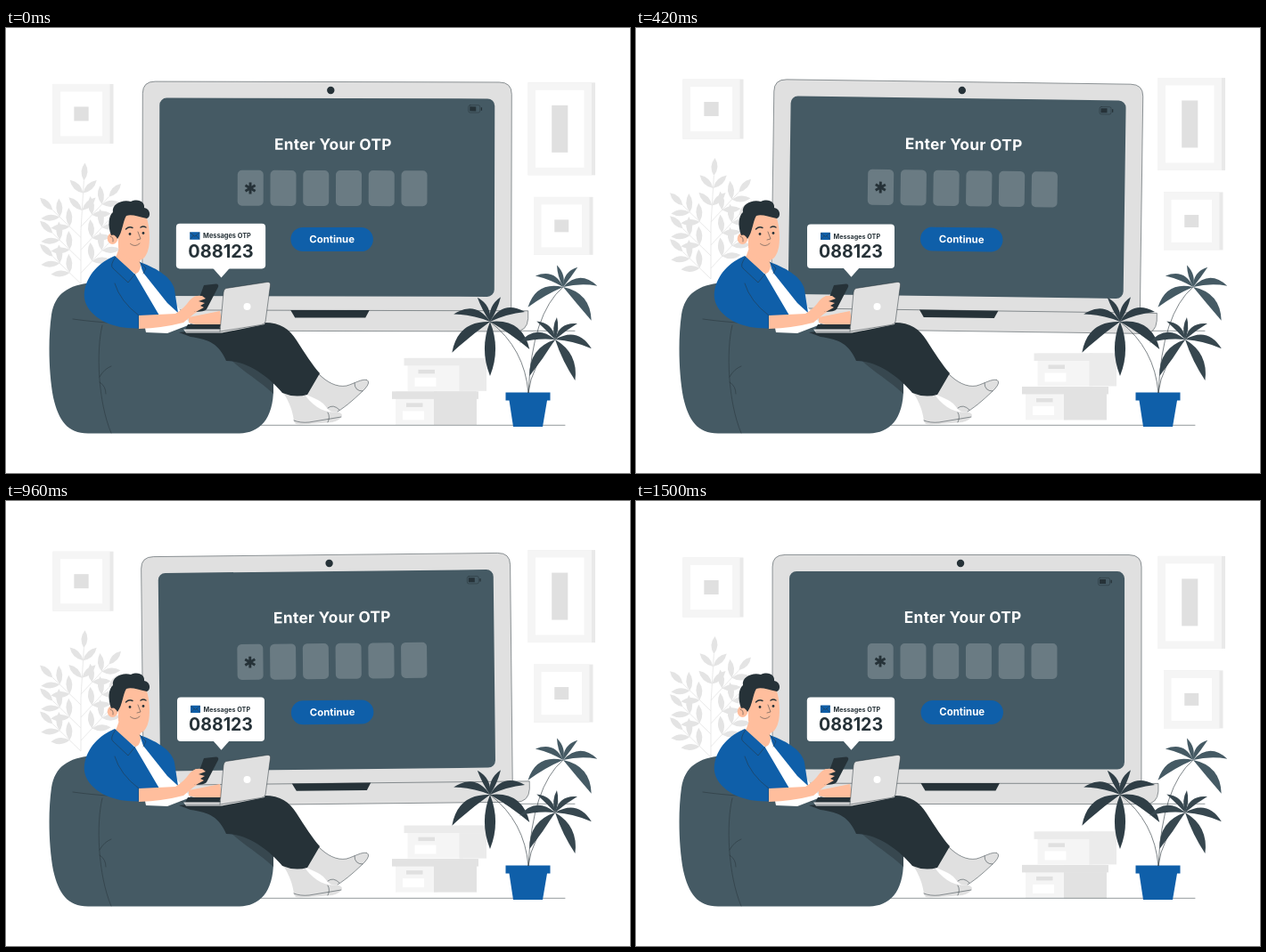
Animation, 700 px wide and 500 px high, one loop 1.54 s. Source, as an HTML page:

```html
<!DOCTYPE html>
<html lang="en">
<head>
<meta charset="utf-8">
<title>Enter Your OTP</title>
<style>
  html, body { margin: 0; width: 100%; height: 100%; overflow: hidden; background: #fff; }
  svg { display: block; width: 100vw; height: 100vh; }
  text { font-family: Inter, "Open Sans", sans-serif; font-weight: 700; text-anchor: middle; }
  .line { fill: none; stroke: #263238; stroke-width: .5; stroke-linecap: round; stroke-linejoin: round; }
  .bold { stroke-width: 1.4; }
  .blue { fill: #0f5fa9; }
  .dark { fill: #263238; }
  .slate { fill: #455a64; }
  .skin { fill: #ffbe9d; }
  .grey { fill: #e0e0e0; }
  .white { fill: #fff; }
</style>
</head>
<body>
<svg viewBox="0 0 700 500">
  <g id="backdrop"></g>
  <path class="line" d="M285 446.300H627M560 340.300H638"/>

  <g id="monitor">
    <path class="grey" d="M153 318V74Q153 60.500 167 60.500H553Q567 60.500 567 74V317H586V326Q585 340.500 571 340.500H134V317H153"/>
    <path class="line" d="M153 318V74Q153 60.500 167 60.500H553Q567 60.500 567 74V317M134 317.300H586V326Q585 340.500 571 340.500H134"/>
    <rect class="slate" x="172" y="79" width="376" height="222.500" rx="8"/>
    <circle class="dark" cx="364" cy="70" r="4.200"/>
    <path class="dark" d="M319.500 317H408L403.500 325.500H324.500Z"/>
    <rect class="line" x="518.500" y="86.300" width="13" height="8.400" rx="2"/>
    <path class="dark" d="M520 88h7v5h-7zM532.500 88.800h1.300v3.500h-1.300z"/>
    <text x="366.700" y="136.800" font-size="17.300" letter-spacing=".3" fill="#fff">Enter Your OTP</text>
    <g id="cells"></g>
    <rect class="blue" x="319.500" y="224" width="92.500" height="27" rx="13.500"/>
    <text x="365.700" y="241.300" font-size="11.400" fill="#fff">Continue</text>
  </g>

  <g id="bubble">
    <rect class="white" x="192" y="220.500" width="98" height="49.500" rx="4"/>
    <path class="white" d="M232 269H251L241.500 279.700Z"/>
    <rect class="blue" x="207" y="229.700" width="11" height="8.300" rx="1"/>
    <path class="line" d="M207.300 230.200L212.500 234.600 217.700 230.200M207.400 237.600L211 233.600M217.600 237.600L214 233.600"/>
    <text class="dark" x="247.800" y="236.800" font-size="7.200">Messages OTP</text>
    <text class="dark" x="241" y="258.300" font-size="19.500">088123</text>
  </g>

  <g id="beanbag">
    <path class="slate" d="M96 286C70 289 55 298 51 322C47 350 48 388 53 415C59 441 69 455.500 92 455.500H262C284 455 300 440 300 405L290 374 250 340 150 322Z"/>
    <path fill="#37474f" d="M244 362C252 378 280 392 300 411L300 396 282 368Z"/>
    <path class="line" d="M75 327C130 335 200 332 243 348M108 334C101 362 103 420 118 455M105 392Q110 383 118 380M105 398Q112 402 112 411"/>
  </g>

  <g id="legs">
    <path class="grey" d="M311 410C318 420 322 432 323 442Q325 447 333 445.500L366 443Q375 441 377 435Q376 431 368 431.500C355 432 343 424 333 409Z"/>
    <path class="grey" d="M351 388C360 398 371 404 382 402C392 399 399 394 405 395.500Q409 398 403 405C394 414 382 425 372 431Q365 433 360 427C355 419 346 416 337 412Z"/>
    <path class="line" d="M323 441Q330 444 340 443L376 437M361 432Q364 437 361 443M351 389C360 398 371 404 382 402C392 399 399 394 405 395.500Q409 398 403 405C394 414 382 425 372 431M391 399Q391 408 400 408M361 427Q367 422 374 429"/>
    <path class="dark" d="M194 342L290 331C308 331 318 338 326 351C335 365 344 379 352 388L338 412Q324 416 310 410C296 393 272 374 247 374C239 355 228 350 207 347Z"/>
  </g>

  <g id="man">
    <path class="white" d="M143 274L158 270 196 318 207 333 181 343 157 342Z"/>
    <path class="skin" d="M128 244L150 255 151 268Q150 275 145 276Q134 269 123 258Z"/>
    <path class="blue" d="M122 256C105 263 91 277 88 296C86 311 96 322 110 330Q126 338 149 337.500V323H172L145 277Z"/>
    <path class="blue" d="M150 263C172 271 186 281 189 294L193 320 181 309 154 275Z"/>
    <path class="line" d="M123 257Q116 267 120 270L137 286 145 276M150 263L157 270 154 276M122 287Q128 307 149 323V337"/>
    <path class="skin" d="M149 323L190 321Q200 315 206 306Q211 300 220 301L224 304Q224 315 211 321L199 331Q176 337 149 338Z"/>
    <path class="skin" d="M205 325L240 318 243 333 228 333Q216 335 205 331Z"/>
    <path class="dark" d="M222 289L236 287.500Q239 288 238 291L225 316Q223 319 211 319Z"/>
    <path class="skin" d="M207 306L213 301H220L224 304 216 307 223 309 218 312 222 314 213 319 204 318Z"/>
    <path class="dark" d="M204 333H241L239 339H201Z"/>
    <path class="grey" d="M199 338.500H243L291 329 290 333 242 342.500H202Z"/>
    <path class="grey" d="M247 292.500L293 285.500Q297 285 296.500 289L291 330Q290 333 286 333.500L240 341 244 297Q244.500 293 247 292.500Z"/>
    <path class="line" d="M240 341L244 297Q244.500 293 247 292.500L293 285.500Q297 285 296.500 289L291 330Q290 333 286 333.500L240 341H202"/>
    <circle class="white" cx="270.500" cy="313" r="4"/>

    <path class="skin" d="M125 210L156 208C161 220 162 237 160 247Q157 262 145 262Q133 260 126 247Z"/>
    <ellipse class="skin" cx="119.500" cy="236.500" rx="5.800" ry="6.500"/>
    <path class="dark" d="M118 233C114 222 115 211 120 207C118 197 132 192 140 195C149 191 156 196 155 202C162 203 163 212 158 214C148 212 141 209 135 211C131 217 131 229 125 237Q122 231 118 233Z"/>
    <circle class="dark" cx="139" cy="231.500" r="1.400"/>
    <circle class="dark" cx="154" cy="230.500" r="1.400"/>
    <path class="line bold" d="M134.500 226Q138 222.500 142 224.500M151 224Q154 222 157 224"/>
    <path class="line" d="M139.500 242.500Q145 247 150 242M148 229L151 237 147 238M117 234Q121 235 120 240"/>
  </g>

  <g id="plant">
    <path class="blue" d="M560.500 409.500H610.500V418.500H607L602 448H569L564.500 418.500H560.500Z"/>
  </g>
</svg>
<script>
const $ = id => document.getElementById(id);
const backdrop = $("backdrop"), plant = $("plant"), cells = $("cells");

function add(parent, tag, attrs) {
  const el = document.createElementNS("http://www.w3.org/2000/svg", tag);
  for (const k in attrs) el.setAttribute(k, attrs[k]);
  parent.append(el);
}

const rect = (parent, x, y, width, height, fill, rx = 0) =>
  add(parent, "rect", { x, y, width, height, fill, rx });

const stroke = (parent, d, color, width) =>
  add(parent, "path", { d, fill: "none", stroke: color, "stroke-width": width });

// Pointed leaf at angle a from upright; bend arches it towards the sky
function leaf(parent, x, y, a, len, w, bend, fill) {
  const s = Math.sin(a), c = Math.cos(a), lift = bend * s;
  const at = (along, across) => `${x + s * along - c * across} ${y - c * along - s * across}`;
  const side = k => `${at(len * .5, lift + k * w)} ${at(len, 0)}`;
  add(parent, "path", { fill, d: `M${at(0, 0)}Q${side(1)}Q${at(len * .5, lift - w)} ${at(0, 0)}` });
}

function picture(x, y, w, h) {
  const face = w - 4, bw = w * .24, bh = h - 51;
  rect(backdrop, x, y, w, h, "#e9e9e9");
  rect(backdrop, x, y, face, h, "#f5f5f5");
  rect(backdrop, x + 8.5, y + 8.5, face - 17, h - 17, "#fff");
  rect(backdrop, x + (face - bw) / 2, y + (h - bh) / 2, bw, bh, "#e0e0e0");
}

function crate(x, y, w, split, h, shade) {
  rect(backdrop, x + 4, y, split, h, "#f5f5f5");
  rect(backdrop, x + split, y, w - split - 2, h, shade);
  rect(backdrop, x, y, w, 8.5, shade);
  rect(backdrop, x + 16, y + 13, 18.5, 4.5, "#e0e0e0");
  rect(backdrop, x + 12, y + 22, 24, 10, "#fff");
}

// Alternating branches up one stem, each with paired leaves
function bush(x, y) {
  const pale = "#e4e4e4";
  const branch = (x0, y0, a, len) => {
    const s = Math.sin(a), c = Math.cos(a);
    stroke(backdrop, `M${x0} ${y0}l${s * len} ${-c * len}`, pale, .8);
    for (const k of [.4, .75])
      for (const turn of [-.85, .75])
        leaf(backdrop, x0 + s * len * k, y0 - c * len * k, a + turn, 21, 7, 0, pale);
    leaf(backdrop, x0 + s * len, y0 - c * len, a, 20, 7, 0, pale);
  };
  stroke(backdrop, `M${x} ${y}V${y - 60}`, pale, .8);
  for (let i = 0; i < 3; i++) {
    branch(x, y - 26 * i, -.8, 44);
    branch(x, y - 26 * i - 12, .75, 46);
  }
  branch(x, y - 60, .06, 56);
}

// Fan of leaves that grow longer and arch more as they hang lower
function crown(x, y, size, from, to, n, fill) {
  stroke(plant, `M586 410Q${586 + (x - 586) * .1} ${y + 30} ${x} ${y}`, "#263238", .6);
  for (let i = 0; i < n; i++) {
    const a = (from + (to - from) * i / (n - 1)) * Math.PI / 180;
    const len = size * (1 + (1 - Math.cos(a)) * .55);
    leaf(plant, x, y, a, len, len * .2, len * .3, fill);
  }
}

picture(52.5, 63.6, 68, 67);
picture(585.5, 62, 75.5, 104);
picture(592, 190.5, 66.5, 65);
bush(84, 288);
crate(446.5, 371.5, 94.5, 62, 37, "#ebebeb");
crate(433, 409, 97, 47, 37.5, "#e2e2e2");

for (let i = 0; i < 6; i++) rect(cells, 259.7 + 36.75 * i, 160, 29, 40, "#6a7b83", 5);
for (let i = 0; i < 3; i++)
  add(cells, "path", { d: "M274 173.800V186.600", stroke: "#263238", "stroke-width": 2.9, transform: `rotate(${60 * i} 274 180.200)` });

crown(625, 291, 25, -120, 140, 6, "#455a64");
crown(543, 330, 29, -180, 125, 7, "#2f3e46");
crown(616, 350, 25, -145, 154, 7, "#37474f");

const LOOP = 1540, STEPS = 37, LEAD = 50;

const sway = p => Math.asin(Math.sin(2 * Math.PI * p)) * 2 / Math.PI;
const peak = (p, mid, half) => Math.max(0, 1 - Math.abs(p - mid) / half);

function draw() {
  const step = Math.floor(((performance.now() + 2) % LOOP) / LOOP * STEPS);
  const p = (step / STEPS + LEAD / LOOP) % 1;
  const beat = 1 + .1 * peak(p, .14, .14) + .09 * peak(p, .51, .12);
  backdrop.setAttribute("transform", `translate(0 ${-10 * peak(p, .5, .5)})`);
  $("monitor").setAttribute("transform", `rotate(${sway(p)} 360 201)`);
  $("bubble").setAttribute("transform", `translate(241 250) scale(${beat}) translate(-241 -250)`);
  requestAnimationFrame(draw);
}
draw();
</script>
</body>
</html>
```
